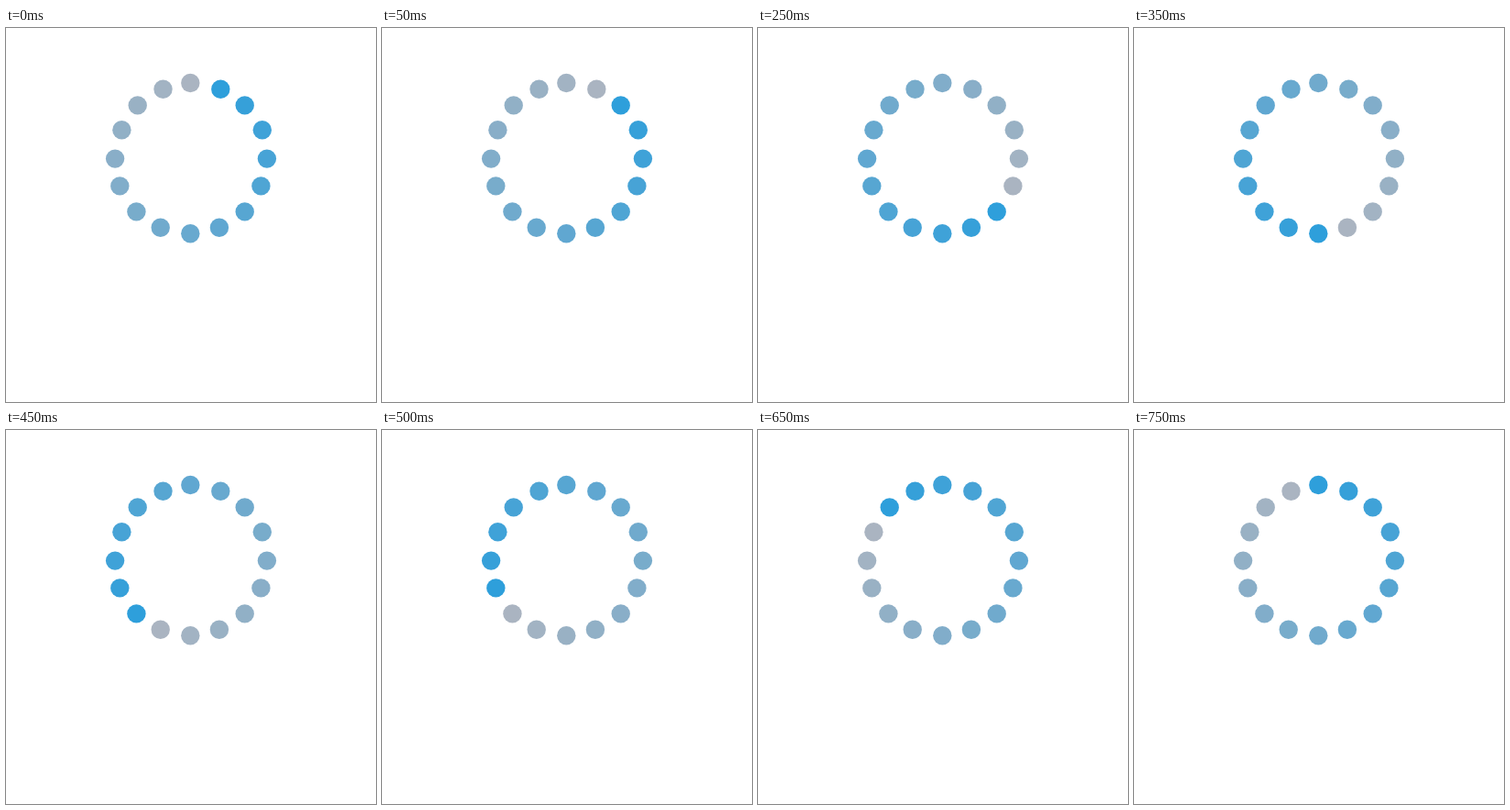
An HTML page that plays this animation: 404x408 px, repeating every 0.8 s.

```html
<!DOCTYPE html>
<html lang="en">
<head>
<meta charset="utf-8">
<title>Loading spinner</title>
<style>
  html, body { margin: 0; width: 100%; height: 100%; overflow: hidden; background: #fff; }
  svg { display: block; width: 404px; height: 408px; }
</style>
</head>
<body>
<svg id="stage" viewBox="0 0 404 408"></svg>
<script>
const STEP = 50;
const RADIUS = 10.2;
const HEAD = [46, 159, 219];
const TAIL = [170, 180, 193];

// Dot centres, clockwise from the top; the ring is slightly irregular.
const centres = [
  [201.3, 60], [234.3, 66.7], [260.7, 84.4], [279.8, 111.2],
  [284.9, 142.6], [278.4, 172.4], [260.7, 200.4], [232.9, 217.7],
  [201.3, 224.2], [168.7, 217.7], [142.4, 200.4], [124.3, 172.4],
  [119.1, 142.6], [126.4, 111.2], [143.7, 84.4], [171.5, 66.7]
];
const count = centres.length;

const stage = document.getElementById('stage');
const dots = centres.map(([cx, cy]) => {
  const dot = document.createElementNS('http://www.w3.org/2000/svg', 'circle');
  dot.setAttribute('cx', cx);
  dot.setAttribute('cy', cy);
  dot.setAttribute('r', RADIUS);
  return stage.appendChild(dot);
});

function mix(p) {
  return `rgb(${HEAD.map((c, i) => Math.round(c + (TAIL[i] - c) * p))})`;
}

function draw() {
  const head = 1 + Math.floor(performance.now() / STEP) % count;
  dots.forEach((dot, i) => {
    const distance = (i - head + count) % count;
    dot.setAttribute('fill', mix(distance / (count - 1)));
  });
  requestAnimationFrame(draw);
}
draw();
</script>
</body>
</html>
```
